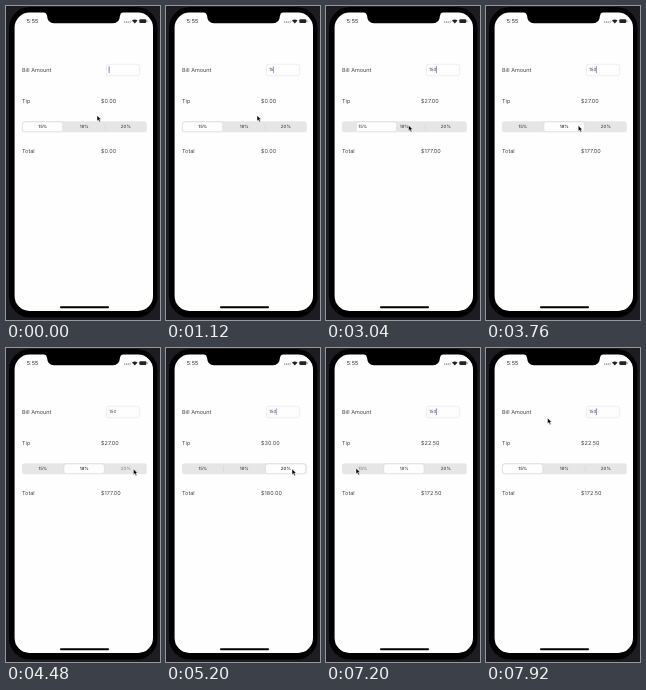
These frames come from a looping animation (154 px wide and 314 px high, 8 s). An HTML page:

```html
<!DOCTYPE html>
<html lang="en">
<head>
<meta charset="utf-8">
<title>Tip calculator</title>
<style>
  html, body { margin: 0; width: 100%; height: 100%; overflow: hidden; background: #1d1c23; }
  svg { display: block; width: 154px; height: 314px; }
  text {
    font: 5.5px Inter, Roboto, sans-serif;
    text-rendering: geometricPrecision;
    fill: #444446;
  }
  .small { font-size: 4.4px; }
  .label { font-size: 4.4px; font-weight: 500; text-anchor: middle; }
  .clock { font-size: 5.5px; font-weight: 500; }
</style>
</head>
<body>
<svg viewBox="0 0 154 314">
  <rect x="3" y="1" width="148.5" height="310.5" rx="21"/>
  <rect x="8.600" y="6.600" width="138.400" height="298.400" rx="15" fill="#fefefe"/>
  <path d="M38 6H117Q114.200 7 114 9.500Q113.500 17.300 107 17.300H48Q41.500 17.300 41 9.500Q40.800 7 38 6Z"/>

  <text class="clock" x="20.7" y="17.4">5:55</text>
  <g fill="#444">
    <circle cx="118.700" cy="16" r=".6"/>
    <circle cx="120.500" cy="16" r=".6"/>
    <circle cx="122.300" cy="16" r=".6"/>
    <circle cx="124.100" cy="16" r=".6"/>
  </g>
  <path d="M126 14.500Q128.800 12.300 131.600 14.500L128.800 17.500Z" fill="#222"/>
  <rect x="133.300" y="13.200" width="7" height="3.900" rx="1" fill="#222"/>
  <rect x="140.700" y="14.400" width=".7" height="1.500" fill="#555"/>

  <text x="16" y="66">Bill Amount</text>
  <rect x="100.300" y="58.300" width="33.400" height="11.400" rx="2" fill="#fefefe" stroke="#e2e2e5" stroke-width=".6"/>
  <text id="amount" class="small" x="103" y="65.300"></text>
  <rect id="caret" y="60.300" width=".8" height="6.800" fill="#5965c6"/>

  <text x="16" y="97.400">Tip</text>
  <text id="tip" x="95" y="97.400"></text>

  <rect x="16" y="115.300" width="124.800" height="11" rx="2.700" fill="#e6e6e7"/>
  <rect class="divider" x="57.200" y="118" width=".5" height="5.600" fill="#d2d2d4"/>
  <rect class="divider" x="98.800" y="118" width=".5" height="5.600" fill="#d2d2d4"/>
  <rect id="thumb" y="115.900" width="40.400" height="9.800" rx="2.300" fill="#fefefe" stroke="#d0d0d3" stroke-width=".5"/>
  <text class="label" x="36.800" y="122.400">15%</text>
  <text class="label" x="78.200" y="122.400">18%</text>
  <text class="label" x="119.800" y="122.400">20%</text>

  <text x="16" y="147.200">Total</text>
  <text id="total" x="95" y="147.200"></text>

  <rect x="54" y="300.300" width="49" height="1.900" rx=".95"/>
  <path id="pointer" d="M0 0V5.700L1.400 4.500L2.400 6.700L3.500 6.200L2.500 4.100H4.200Z" stroke="#fff" stroke-width=".5"/>
</svg>
<script>
const LOOP = 8000, SLIDE = 300, BLINK = 1020, FADE = 240;
const $ = id => document.getElementById(id);
const labels = document.querySelectorAll('.label');
const dividers = document.querySelectorAll('.divider');

const typing = [[0, ''], [560, '1'], [640, '15'], [1520, '150']];
// time, segment, tip rate
const taps = [[2925, 1, .18], [4540, 2, .2], [5940, 1, .18], [7190, 0, .15]];
// start, end, x, y
const moves = [
  [2320, 2860, 82.5, 119.2],
  [3520, 4320, 127.4, 121],
  [5120, 5900, 81.3, 119.8],
  [6300, 6800, 30, 120.2],
  [7690, 7910, 61.5, 70]
];

const clamp = v => Math.min(1, Math.max(0, v));
const smooth = v => (v = clamp(v)) * v * (3 - 2 * v);
const money = v => '$' + v.toFixed(2);

function caretOpacity(t) {
  if (t < 1040) return 1;
  const phase = (t - 1040) % BLINK;
  return phase < 480 ? 1 - smooth(phase / FADE) : smooth((phase - 480) / FADE);
}

function draw(t) {
  const amount = $('amount');
  amount.textContent = typing.filter(([at]) => t >= at).pop()[1];
  $('caret').setAttribute('x', 102.7 + amount.getComputedTextLength());
  $('caret').setAttribute('opacity', caretOpacity(t));

  let segment = 0, rate = 0, selected = 0;
  const press = [0, 0, 0];
  for (const [at, target, tapRate] of taps) {
    segment += (target - segment) * smooth((t - at) / SLIDE);
    if (t >= at) [selected, rate] = [target, tapRate];
    const down = clamp((t - at + 160) / 80) * (1 - smooth((t - at) / 180));
    press[target] = Math.max(press[target], down);
  }
  $('tip').textContent = money(150 * rate);
  $('total').textContent = money(rate && 150 * (1 + rate));
  $('thumb').setAttribute('x', 16.4 + 41.5 * segment);
  labels.forEach((label, i) => {
    label.setAttribute('opacity', 1 - .45 * press[i]);
    label.style.fontWeight = i === selected ? 600 : 500;
  });
  dividers.forEach((line, i) =>
    line.setAttribute('opacity', clamp(2 * Math.abs(segment - i - .5) - 1)));

  let x = 91, y = 109.4;
  for (const [start, end, toX, toY] of moves) {
    const k = smooth((t - start) / (end - start));
    x += (toX - x) * k;
    y += (toY - y) * k;
  }
  $('pointer').setAttribute('transform', `translate(${x} ${y})`);
}

const began = performance.now();
function tick() {
  draw((performance.now() - began) % LOOP);
  requestAnimationFrame(tick);
}
tick();
</script>
</body>
</html>
```
